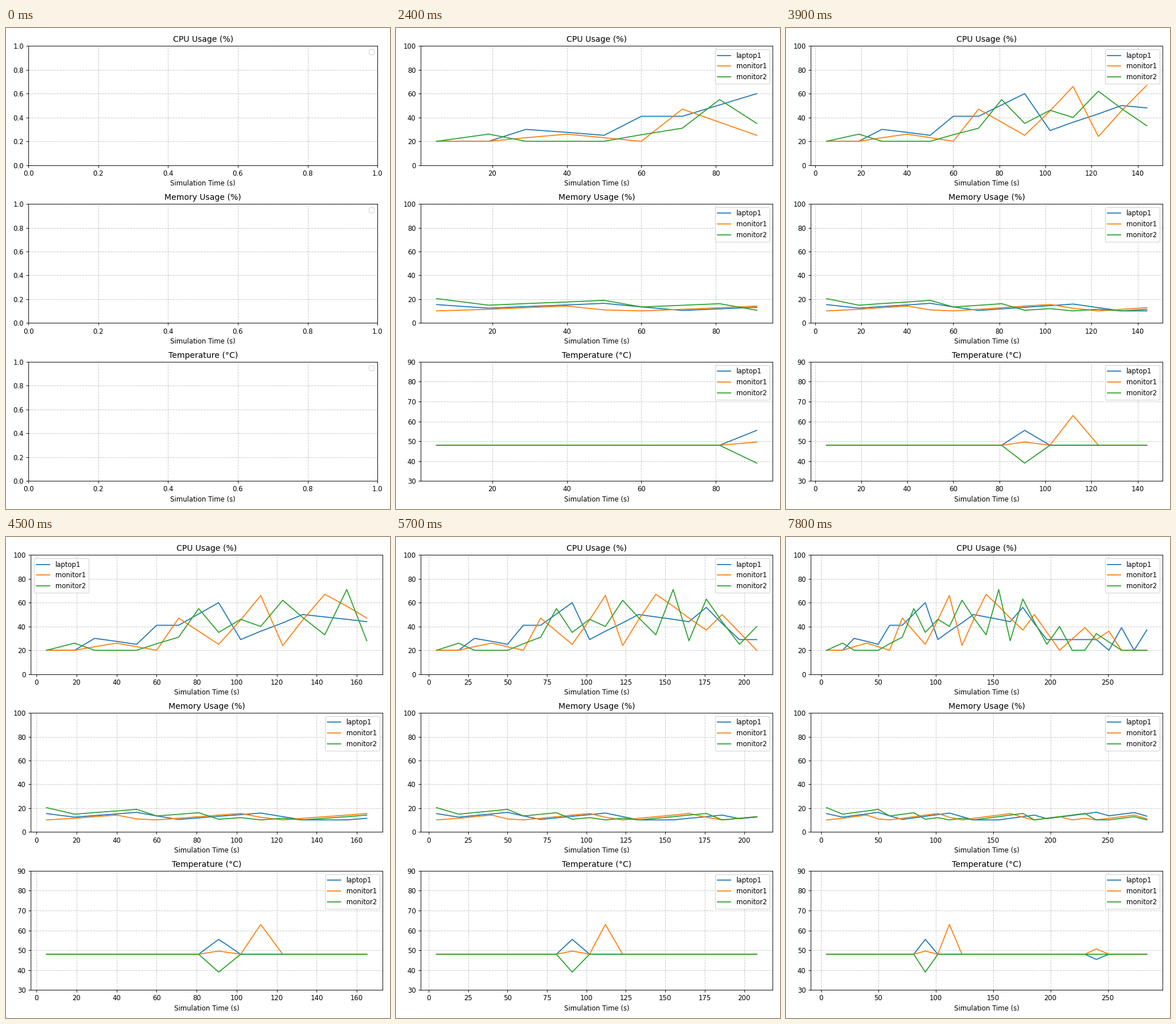
Animation, 669 px wide and 837 px high, one loop 8000 ms. Source, as a matplotlib script:

```python
import numpy as np
import matplotlib.pyplot as plt
from matplotlib.animation import FuncAnimation

WIDTH, HEIGHT = 669, 837
DPI, LAYOUT_DPI = WIDTH / 8, 100
LOOP_MS, TICK_MS, STEP_MS = 8000, 100, 300

DEVICES = ("laptop1", "monitor1", "monitor2")
STEPS = np.arange(27)

# Samples come slightly slower over the run; the first one is early.
TIMES = np.round(8.8 + 10.2 * STEPS + 0.0148 * STEPS**2)
TIMES[0] = 5


def cpu_load(turns):
    """Straight runs between turning points given as step: load."""
    return np.interp(STEPS, list(turns), list(turns.values()))


def memory_use(start, drop, restarts, growth=1.35, floor=10.2):
    """Steady growth; every restart frees some memory, down to a floor."""
    levels = [start]
    for step in STEPS[1:]:
        if step in restarts:
            levels.append(max(floor, levels[-1] - drop))
        else:
            levels.append(levels[-1] + growth)
    return levels


def temperature(spikes, idle=48):
    return [spikes.get(step, idle) for step in STEPS]


CPU = (
    cpu_load({1: 20, 2: 30, 4: 25, 5: 41, 6: 41, 8: 60, 9: 29, 12: 50, 15: 44,
              16: 56, 18: 29, 22: 29, 23: 20, 24: 39, 25: 20, 26: 37}),
    cpu_load({1: 20, 3: 26, 5: 20, 6: 47, 8: 25, 10: 66, 11: 24, 13: 67, 16: 37,
              17: 50, 19: 20, 21: 39, 22: 29, 23: 36, 24: 20}),
    cpu_load({0: 20, 1: 26, 2: 20, 4: 20, 6: 31, 7: 55, 8: 35, 9: 46, 10: 40,
              11: 62, 13: 33, 14: 71, 15: 28, 16: 63, 18: 25, 19: 40, 20: 20,
              21: 20, 22: 34, 24: 20}),
)
MEMORY = (
    memory_use(15.5, 3.0, {1, 5, 6, 11, 12, 13, 14, 18, 23, 26}),
    memory_use(10.2, 3.2, {4, 5, 10, 11, 16, 17, 20, 22, 26}),
    memory_use(20.5, 5.5, {1, 5, 8, 10, 12, 17, 22, 23, 26}),
)
TEMPERATURE = (
    temperature({8: 55.5, 22: 45.4}),
    temperature({8: 49.6, 10: 63, 22: 50.7}),
    temperature({8: 39}),
)

PANELS = (
    ("CPU Usage (%)", CPU, (0, 100)),
    ("Memory Usage (%)", MEMORY, (0, 100)),
    ("Temperature (°C)", TEMPERATURE, (30, 90)),
)

fig, axes = plt.subplots(3, 1, figsize=(WIDTH / DPI, (HEIGHT + 1e-6) / DPI), dpi=DPI)
shown = {"step": None}


def draw_panel(ax, title, series, limits, step):
    ax.clear()
    lines = []
    if step:
        for name, values in zip(DEVICES, series):
            lines += ax.plot(TIMES[:step + 1], values[:step + 1], label=name)
        ax.set_ylim(*limits)
    ax.set_title(title)
    ax.set_xlabel("Simulation Time (s)")
    ax.grid(True, linestyle="--", alpha=0.7)
    ax.legend(handles=lines, loc="best")


def fit_layout():
    # Measure text at the nominal resolution so rounding does not shift the axes.
    dpi = fig.dpi
    fig.dpi = LAYOUT_DPI
    fig.tight_layout()
    fig.dpi = dpi


def update(frame):
    step = frame * TICK_MS // STEP_MS
    if step != shown["step"]:
        shown["step"] = step
        for ax, panel in zip(axes, PANELS):
            draw_panel(ax, *panel, step)
        fit_layout()
    return []


def reset():
    shown["step"] = None
    return update(0)


anim = FuncAnimation(fig, update, frames=LOOP_MS // TICK_MS, init_func=reset,
                     interval=TICK_MS, repeat=True, repeat_delay=0, blit=False)
plt.show()
```
